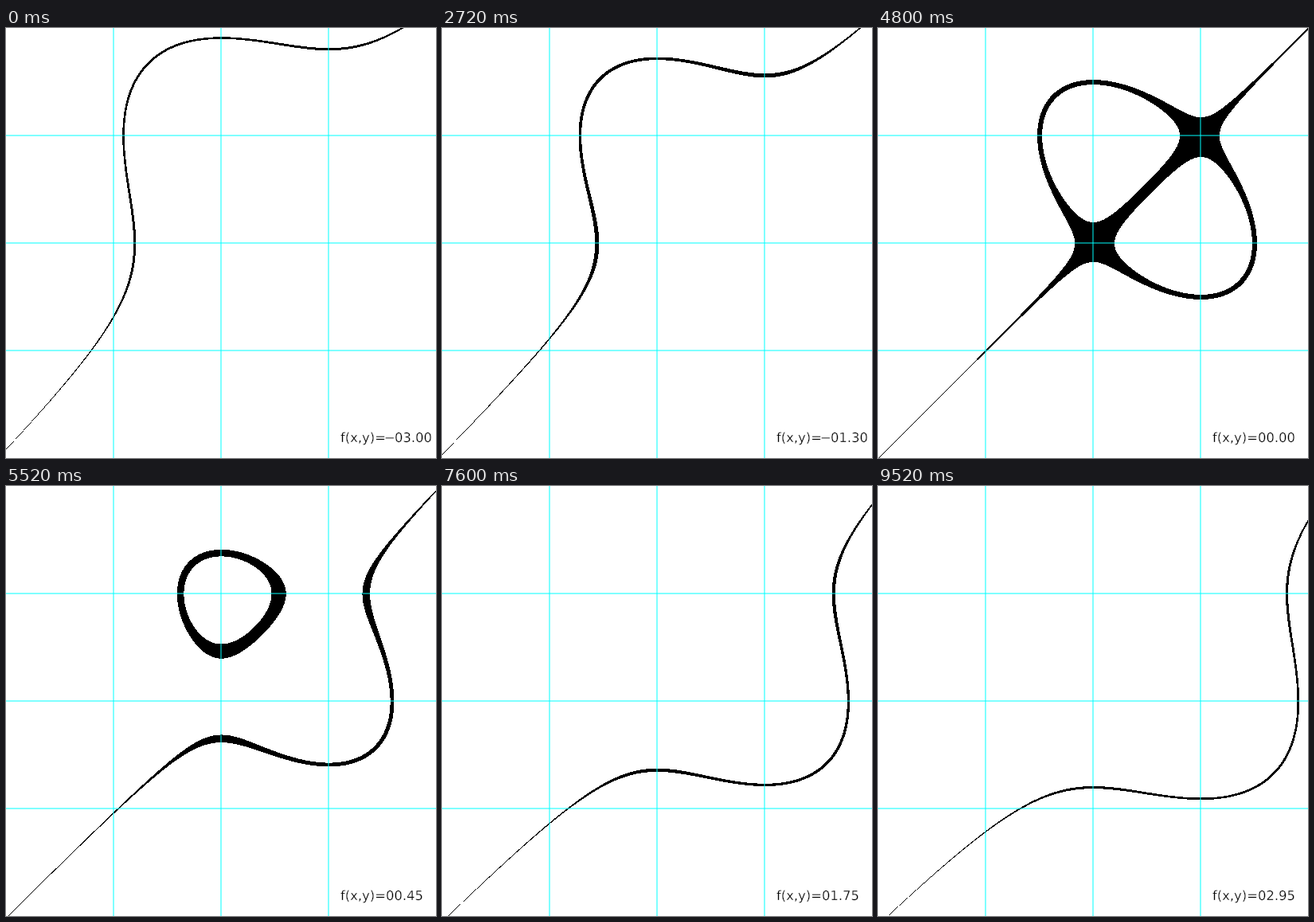
Animation of 540 by 540 pixels, one loop 9600 ms. Source, as a matplotlib script:

```python
import numpy as np
import matplotlib.pyplot as plt
from matplotlib.animation import FuncAnimation
from matplotlib.patches import PathPatch
from matplotlib.path import Path
from matplotlib.textpath import TextPath
from matplotlib.transforms import Affine2D

SIZE, DPI = 540, 100
UNIT = SIZE / 4
FRAMES, INTERVAL = 120, 80
BAND = 0.1
PX = 72 / DPI
FONT_SIZE = 16.4
BASELINE = 520

fig = plt.figure(figsize=(SIZE / DPI, SIZE / DPI), dpi=DPI, facecolor="white")
ax = fig.add_axes([0, 0, 1, 1])
ax.axis("off")


def g(t):
    return 2 * t**3 - 3 * t**2


# Level field f(x, y) = g(x) - g(y) on [-2, 2] x [-2, 2]
steps = np.arange(SIZE) / UNIT - 2
field = g(steps)[None, :] - g(-steps)[:, None]


def glyphs(text, x):
    path = TextPath((0, 0), text, size=FONT_SIZE, prop="DejaVu Sans")
    return path.transformed(Affine2D().scale(1, -1).translate(x, BASELINE))


def label_path(level):
    parts = [glyphs("f(x,y)=", 420)]
    x = 477
    if level < 0:
        parts.append(glyphs("\u2212", 475))
        x = 488
    parts.append(glyphs(f"{abs(level):05.2f}", x))
    return Path.make_compound_path(*parts)


image = ax.imshow(np.ones((SIZE, SIZE)), cmap="gray", vmin=0, vmax=1,
                  extent=(0, SIZE, SIZE, 0), interpolation="nearest", zorder=1)
for k in (1, 2, 3):
    p = k * UNIT
    for xs, ys in (([p, p], [0, SIZE]), ([0, SIZE], [p, p])):
        ax.plot(xs, ys, color="cyan", lw=PX, snap=False, zorder=2)

# A thin white edge slims the letter strokes
label = PathPatch(label_path(-3), facecolor="black", edgecolor="white",
                  lw=0.35 * PX, snap=False, zorder=3)
ax.add_patch(label)
ax.set_xlim(0, SIZE)
ax.set_ylim(SIZE, 0)


def draw(n):
    level = (n - 60) / 20
    image.set_data((np.abs(field - level) >= BAND).astype(float))
    label.set_path(label_path(level))
    return image, label


anim = FuncAnimation(fig, draw, frames=FRAMES, interval=INTERVAL,
                     repeat=True, repeat_delay=0)
plt.show()
```
